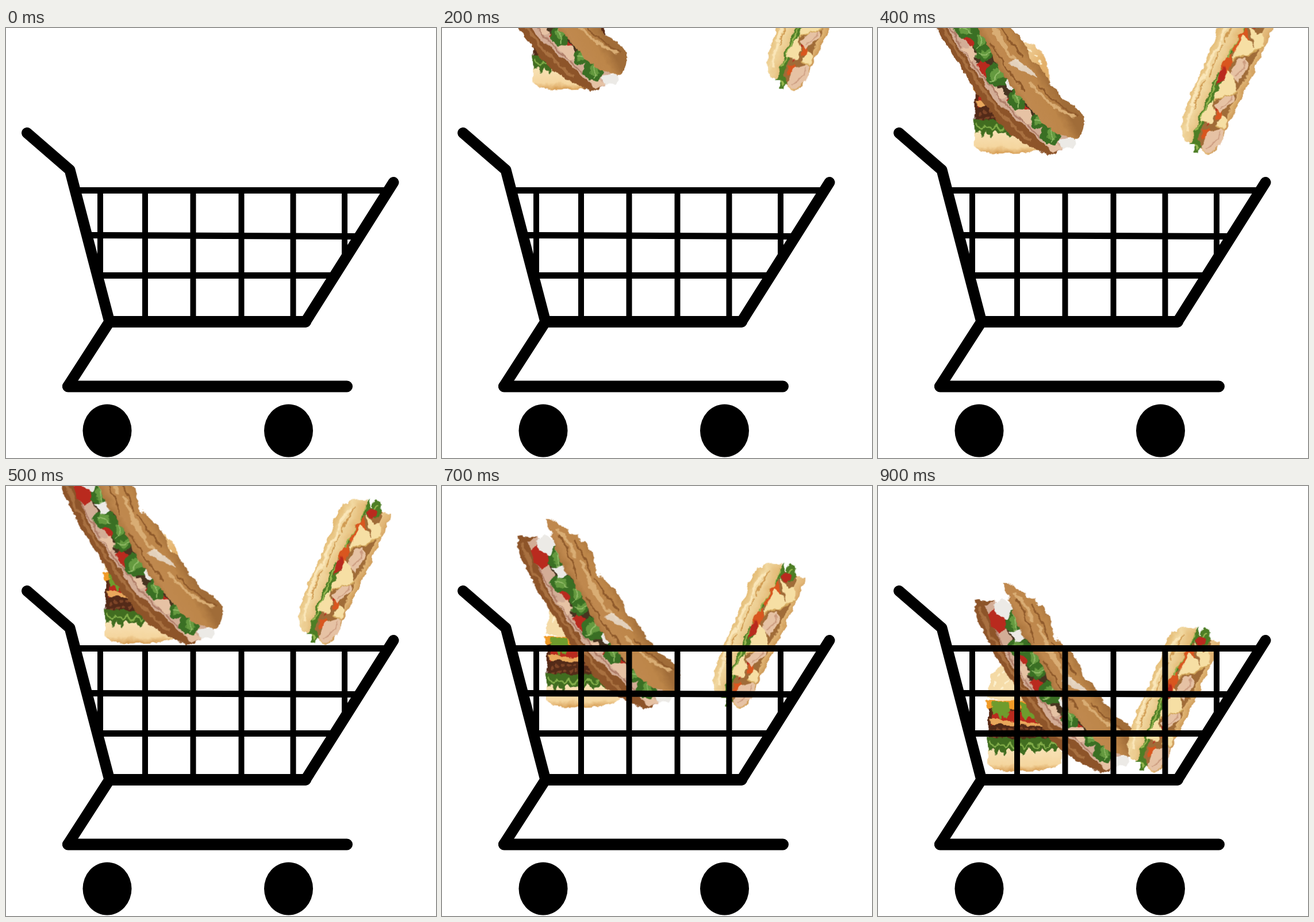
These frames come from a looping animation (748x748 px, 1 s). An HTML page without scripts:

```html
<!DOCTYPE html>
<html lang="en">
<head>
<meta charset="utf-8">
<title>Sandwich cart</title>
<style>
  html, body { margin: 0; width: 100%; height: 100%; overflow: hidden; background: #fff; }
  svg { display: block; width: 100%; height: 100%; }

  /* --dx, --dy: travel per tenth of the loop */
  .food { --dy: 55.6px; animation: drop 1s steps(10, end) infinite; }
  .food > g { filter: url(#rough); }
  .burger { --dx: 4.7px; }
  .baguette { --dx: 18.5px; }
  .sub { --dx: -18.8px; }
  @keyframes drop {
    from { transform: translate(calc(var(--dx) * -6), calc(var(--dy) * -6)); }
    to { transform: translate(calc(var(--dx) * 4), calc(var(--dy) * 4)); }
  }

  .cart { fill: none; stroke: #000; stroke-width: 19; stroke-linecap: round; stroke-linejoin: round; }
  .rail { stroke-width: 20; }
  .grid { stroke-width: 11; stroke-linecap: butt; }
  .bars { stroke-width: 10; stroke-linecap: butt; }
  .line { fill: none; stroke-linecap: round; stroke-linejoin: round; }
  .tomato { fill: #b92a1e; }
  .carrot { fill: #d9561f; }
  .ham { fill: #e6c2a4; }
  .cheese { fill: #f6dfa4; }
  .egg { fill: #eceae6; }
</style>
</head>
<body>
<svg viewBox="0 0 748 748">
  <defs>
    <filter id="rough" x="-5%" y="-5%" width="110%" height="110%" color-interpolation-filters="sRGB">
      <feTurbulence type="fractalNoise" baseFrequency=".07" numOctaves="3" seed="4"/>
      <feDisplacementMap in="SourceGraphic" scale="11" xChannelSelector="R" yChannelSelector="G"/>
    </filter>
    <linearGradient id="bun" x2="1" y2=".3">
      <stop offset="0" stop-color="#f3d7a0"/>
      <stop offset=".5" stop-color="#f7dfae"/>
      <stop offset="1" stop-color="#e3b06a"/>
    </linearGradient>
    <linearGradient id="base" x2="0" y2="1">
      <stop offset="0" stop-color="#f9e6bd"/>
      <stop offset=".75" stop-color="#f5d69f"/>
      <stop offset="1" stop-color="#d69c52"/>
    </linearGradient>
    <linearGradient id="crust" gradientUnits="userSpaceOnUse" x1="225" y1="170" x2="295" y2="130">
      <stop offset="0" stop-color="#99642f"/>
      <stop offset=".35" stop-color="#c0894f"/>
      <stop offset=".75" stop-color="#bd8649"/>
      <stop offset="1" stop-color="#a06c38"/>
    </linearGradient>
    <linearGradient id="loaf" gradientUnits="userSpaceOnUse" x1="522" y1="175" x2="568" y2="195">
      <stop offset="0" stop-color="#dfb063"/>
      <stop offset=".4" stop-color="#f2d9a2"/>
      <stop offset="1" stop-color="#e0b36c"/>
    </linearGradient>
    <linearGradient id="heel" gradientUnits="userSpaceOnUse" x1="575" y1="205" x2="605" y2="220">
      <stop offset="0" stop-color="#efd19b"/>
      <stop offset=".6" stop-color="#e2b777"/>
      <stop offset="1" stop-color="#c8924f"/>
    </linearGradient>
    <g id="leaf">
      <path fill="#3a6f24" d="M-17-5Q-16-16-6-15Q3-21 9-12Q18-9 14 0Q20 10 10 13Q6 21-3 16Q-13 19-14 9Q-22 3-17-5Z"/>
      <path fill="#659a40" d="M-11-4Q-5-13 3-10Q9-5 6 1Q10 7 3 9Q-5 11-6 5Q-13 3-11-4Z"/>
      <path class="line" stroke="#94bd6a" stroke-width="2" d="M-9-8Q1-2 7 11"/>
    </g>
  </defs>

  <g class="food burger"><g>
    <path fill="url(#bun)" d="M177 203Q175 170 190 152Q210 132 243 132Q282 134 298 158Q309 178 306 207Q240 216 177 203Z"/>
    <path class="line" stroke="#fdf0cd" stroke-width="3" stroke-dasharray="5 9" d="M187 178Q205 145 245 143Q282 145 297 181M200 187Q215 160 245 158Q275 160 285 190"/>
    <path fill="#5a2b17" d="M178 212H302V280H178Z"/>
    <path fill="#f09a27" d="M173 207L300 210L292 222L176 219Z"/>
    <path class="tomato" d="M183 229Q210 219 240 226L298 230V249H183Z"/>
    <path fill="#6e9c2d" d="M184 209L213 210L216 222L210 237L203 231L197 238L193 226L186 229ZM230 212L298 214L292 238L276 230L262 245L252 232L241 240Z"/>
    <path fill="#e9a85c" d="M178 240Q195 235 214 242L290 247L296 256L230 250L194 255Z"/>
    <path fill="#532a18" d="M177 256Q185 246 210 248L295 252Q306 260 300 279L180 281Q174 270 177 256Z"/>
    <path class="line" stroke="#7d4427" stroke-width="4" stroke-dasharray="3 7" d="M184 260Q240 249 295 262M187 269Q240 262 292 271"/>
    <path fill="url(#base)" d="M177 288Q240 278 306 288L304 315Q299 323 280 326Q240 332 199 328Q179 324 177 314Z"/>
    <path fill="#416d20" d="M176 272Q190 268 210 272L303 271L304 284L296 296L288 290L280 300L270 289L259 298L250 290L239 302L232 290L221 296L213 289L206 302L197 293L190 302L186 290L178 294Z"/>
    <path class="line" stroke="#83ae4a" stroke-width="3" d="M181 279L190 289L196 280L207 290L216 279L224 289L233 281L241 291L249 281L260 289L269 280L279 290L290 279L298 286"/>
  </g></g>

  <g class="food baguette"><g>
    <path fill="#8d5429" d="M112 34Q118 29 130 32L145 33L190 90L250 190L310 250L365 295L361 318L345 331Q324 331 305 320Q284 308 268 297L245 275L210 225L178 175L150 130L130 90L115 55Z"/>
    <path class="line" stroke="#a87040" stroke-width="5" d="M120 45L140 94L174 150L214 211L255 266L300 306"/>
    <path fill="#d3ad96" d="M130 42L147 33L190 85L245 180L320 255L368 298L360 322L341 328L290 280L240 236L203 182L165 125Z"/>
    <path class="line" stroke="#b07e69" stroke-width="3" d="M145 80L183 146L220 200L265 250L320 302"/>
    <path fill="#473420" d="M160 68L183 45L220 115L268 200L330 265L310 278L255 230L205 165Z"/>
    <path class="tomato" d="M134 56L147 45L165 61L167 82L155 91L140 77ZM181 126L201 123L210 139L196 146ZM209 173L222 166L238 188L235 204L221 198ZM260 237L274 229L302 251L288 258Z"/>
    <path class="ham" d="M181 145L202 142L211 160L200 171ZM232 208L252 216L261 234L249 231ZM273 249L302 252L309 274L293 277ZM325 309L346 309L361 320L341 328Z"/>
    <use href="#leaf" transform="translate(183 68) rotate(25) scale(.95 1.2)"/>
    <use href="#leaf" transform="translate(190 113) rotate(-20) scale(1.1 .9)"/>
    <use href="#leaf" transform="translate(216 134) rotate(60) scale(1.2 .85)"/>
    <use href="#leaf" transform="translate(223 156) rotate(130) scale(.9 .8)"/>
    <use href="#leaf" transform="translate(244 194) rotate(80) scale(1.2)"/>
    <use href="#leaf" transform="translate(280 234) rotate(30)"/>
    <use href="#leaf" transform="translate(318 272) rotate(-35) scale(.9 .8)"/>
    <use href="#leaf" transform="translate(339 297) rotate(45) scale(1.1 .95)"/>
    <path class="egg" d="M146 42Q155 29 166 30L178 43L170 64L153 58ZM172 88L192 82L203 97L184 105ZM256 203L272 194L283 213L266 220ZM352 308L381 301L378 316L359 322Z"/>
    <path fill="url(#crust)" d="M162 3Q171 2 181 8L215 30Q237 45 243 65Q248 75 250 94L282 125Q296 140 301 164Q325 183 332 199L352 229L385 252Q396 262 394 275L390 301Q384 309 374 304L350 294Q327 284 315 264L270 215L245 177L220 127L193 88L178 52Q173 29 162 3Z"/>
    <path class="line" stroke="#d9ad74" stroke-width="5" d="M181 20Q205 42 214 68M222 73Q237 112 262 145M240 118Q256 151 287 176M299 206Q333 247 377 266"/>
    <path class="line" stroke="#8f5a2b" stroke-width="3" d="M187 31Q207 70 218 105M212 40Q234 74 240 100M247 106Q270 138 289 162M234 139Q259 182 292 219M317 210Q344 243 382 265"/>
    <path fill="#eaded1" opacity=".85" d="M263 171L278 166L304 184L313 197L292 190Z"/>
  </g></g>

  <g class="food sub"><g>
    <path fill="url(#heel)" d="M618 91L650 104Q650 115 638 138L603 216L574 276L555 316Q547 331 537 331L525 323L540 270L582 170Z"/>
    <path fill="#a06c38" d="M602 88L636 98L630 140L590 220L548 306L525 323L509 308L536 238L574 147Z"/>
    <path fill="#4d7e25" d="M602 86L612 80L617 95L621 81L632 82L636 97L628 111L604 108L585 140L570 178L557 213L541 245L525 282L520 304L526 320L518 331L510 326L514 312L503 312L510 280L533 231L553 189L574 144Z"/>
    <path class="line" stroke="#98b951" stroke-width="3" d="M608 94L586 133L558 190L538 235L517 287M619 98L628 90M514 313L519 323"/>
    <path class="carrot" d="M593 118L604 111L608 129L589 153L579 150ZM567 163L579 157L576 181L560 201L555 192ZM551 251L564 245L562 267L551 272ZM527 289L540 284L535 303L525 304Z"/>
    <path class="tomato" d="M615 94L626 99L619 113L609 106ZM556 183L568 177L565 197L553 211ZM541 258L552 248L546 270L535 279Z"/>
    <path class="ham" d="M587 168L602 162L607 177L590 205L574 196ZM564 228L584 219L580 239L558 261L549 246ZM537 291L566 286L558 313L542 328L526 320Z"/>
    <path class="line" stroke="#cc9c80" stroke-width="2" d="M600 168Q599 188 583 195M578 227Q573 244 558 252M558 292Q553 310 537 319"/>
    <path class="cheese" d="M607 106L624 122L634 117L633 145L618 150ZM596 121L609 133L620 151L578 168ZM570 184L581 200L588 225L545 236ZM543 236L550 260L545 277L522 272ZM563 262L571 273L564 288L549 281Z"/>
    <path class="line" stroke="#d3a85c" stroke-width="2" d="M578 168L620 151M545 236L587 225M618 150L633 145M549 281L564 288"/>
    <path fill="url(#loaf)" d="M575 83Q590 76 605 80Q614 86 602 104L582 139L558 183L539 222L519 270Q514 296 506 309Q495 311 492 300Q488 280 497 256Q504 228 519 200L535 164L549 126Q556 98 575 83Z"/>
    <path class="line" stroke="#fae6b8" stroke-width="5" d="M581 97Q564 108 560 133M558 140Q539 160 534 191M530 193Q514 216 510 246M508 253Q500 271 502 290"/>
    <path class="line" stroke="#d09b52" stroke-width="2" d="M590 91Q573 108 566 137M562 142Q545 166 540 195M533 201Q517 226 512 253"/>
  </g></g>

  <g class="cart">
    <path d="M36.500 182.500L111 247L180 511M521 511L674 268.500M180 511L107.500 623.500"/>
    <path class="rail" d="M180 511H521M108 623.500H593"/>
    <path class="grid" d="M125 282.500H662M148 360.500L610 362.500M165 430.500H567"/>
    <path class="bars" d="M164 282V430M242 282V505M325.500 282V505M409.500 282V505M499.500 282V505M589 282V400"/>
  </g>
  <ellipse cx="176" cy="700.500" rx="42.500" ry="46"/>
  <ellipse cx="491.500" cy="700.500" rx="42.500" ry="46"/>
</svg>
</body>
</html>
```
